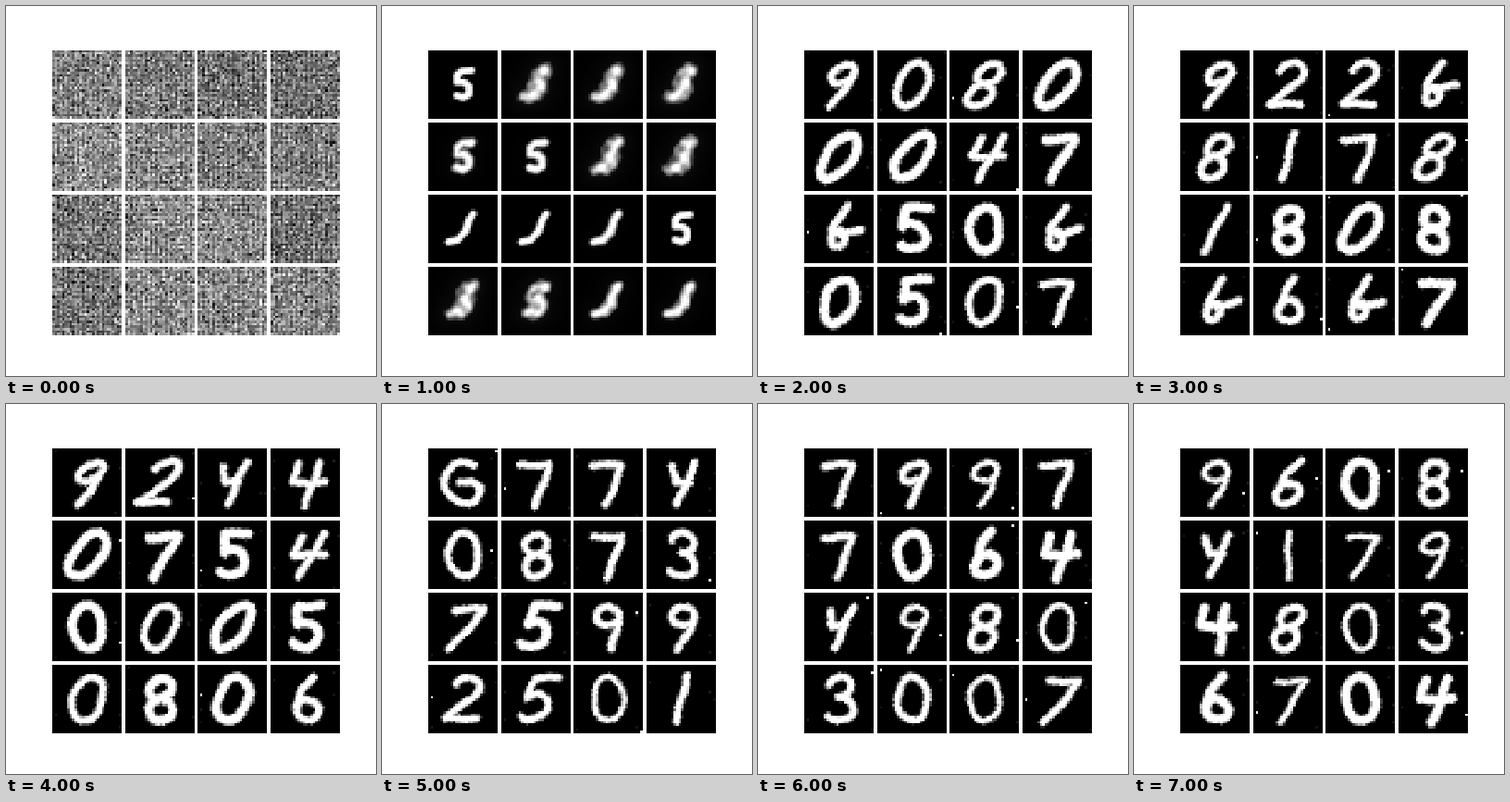
Recreate the animation shown at these times as a matplotlib script. Size 400 px wide and 400 px high, loop 8 s.

```python
import numpy as np
import matplotlib.pyplot as plt
from matplotlib.animation import FuncAnimation
from matplotlib.gridspec import GridSpec

N = 28        # pixels along one side of a tile
HALF = 9.2    # half the height of a digit, in tile pixels
yy, xx = np.mgrid[0:N, 0:N] + 0.5


def arc(cx, cy, rx, ry, start=0, end=360):
    a = np.radians(np.linspace(start, end, 60))
    return np.column_stack([cx + rx * np.cos(a), cy + ry * np.sin(a)])


def line(*flat):
    p = np.reshape(flat, (-1, 2))
    t = np.linspace(0, len(p) - 1, 60)
    k = np.arange(len(p))
    return np.column_stack([np.interp(t, k, p[:, 0]), np.interp(t, k, p[:, 1])])


# Skeletons around the tile centre, y downwards from -1 to 1
glyphs = {
    "0": [arc(0, 0, .65, .95)],
    "1": [line(0, -1, 0, 1)],
    "2": [arc(0, -.45, .55, .5, 200, 400), line(.42, -.13, -.6, .85, .75, .85)],
    "3": [arc(0, -.5, .5, .45, 200, 450), arc(0, .45, .6, .5, 270, 510)],
    "4": [line(-.5, -.8, -.6, 0, .8, 0), line(.4, -.9, .2, 1)],
    "5": [line(.7, -.95, -.3, -.9, -.4, -.15), arc(-.05, .35, .6, .55, 235, 500)],
    "6": [arc(.05, .45, .5, .45), line(.3, -1, -.15, -.4, -.4, .4)],
    "7": [line(-.7, -.75, .55, -.8, .35, -.1, -.1, 1)],
    "8": [arc(0, -.45, .48, .43), arc(0, .48, .5, .48)],
    "9": [arc(-.05, -.45, .5, .4), line(.45, -.5, .35, .2, .1, 1)],
    "b": [line(.1, -1, -.3, 0, -.2, .7), arc(.05, .45, .3, .35), line(.1, .25, 1, 0)],
    "y": [line(-.4, -.7, -.3, 0, .3, -.05), line(.6, -.9, .2, 0, -.2, .95)],
    "G": [arc(0, 0, .8, .9, 300, 15), line(.75, .2, .4, -.1, -.1, 0)],
}

# One word per tile: "/" leans it, "+" makes it bolder, "-" thinner
words = {
    3: "9// 2/ 2/ b/  8/ 1/ 7 8//  1// 8+ 0//+ 8+  b/ 6 b/ 7/+",
    4: "9// 2// y 4/  0//+ 7/+ 5+ 4//  0+ 0/ 0//+ 5+  0/ 8+ 0/+ 6",
    5: "G 7 7 y  0 8 7 3  7// 5/+ 9 9/  2/ 5/ 0- 1/",
    7: "9/- 6/ 0+ 8  y 1- 7/- 9/-  4+ 8/ 0- 3  6+ 7/- 0+ 4/+",
}
words = {k: w.split() for k, w in words.items()}


def remix(seed, pool):
    return list(np.random.default_rng(seed).permutation(pool)[:16])


words[2] = remix(2, words[3] + words[4])
words[6] = remix(6, words[5] + words[7])


def distance(strokes):
    p = N / 2 + 0.2 + HALF * np.vstack(strokes)
    return np.hypot(xx[..., None] - p[:, 0], yy[..., None] - p[:, 1]).min(-1)


def ink(d, width, soft=1.1):
    return np.clip(0.5 + (width / 2 - d) / soft, 0, 1)


def written(word, rng):
    """A slightly wobbly digit with a few stray specks."""
    lean = 0.25 * word.count("/")
    width = 3.1 + 0.8 * word.count("+") - 0.6 * word.count("-")
    phase = rng.uniform(0, 2 * np.pi, 2)
    strokes = []
    for p in glyphs[word[0]]:
        x, y = p.T
        strokes.append(np.column_stack([x - lean * y + 0.04 * np.sin(4 * y + phase[0]),
                                        y + 0.04 * np.sin(4 * x + phase[1])]))
    img = ink(distance(strokes) + rng.normal(0, 0.15, (N, N)), width)
    for level in (0.08, 0.12, rng.choice([0.1, 0.9])):
        row, col = rng.integers(N), rng.choice([1, 25, 27])
        img[row, col] = max(img[row, col], level)
    return img


# The early shapes all lie between a narrow five and a long swash
five = distance([line(.35, -.63, -.05, -.6, -.28, -.4, -.28, -.1, .05, -.1, .25, .1,
                      .25, .4, 0, .57, -.28, .47)])
swash = distance([line(-.66, .57, -.25, .48, .1, .1, .25, -.4, .42, -.66)])


def blended(mix, rng):
    blur = 4 * mix * (1 - mix)
    d = (1 - mix) * five + mix * swash
    ripple = np.sin(xx * 1.1 + rng.uniform(0, 6)) * np.sin(yy * 0.9 + rng.uniform(0, 6))
    img = ink(d + 0.5 * blur * ripple, 2.8 + 1.6 * blur, 1.1 + 1.9 * blur)
    return np.maximum(img, 0.1 * blur * np.exp(-d / 4))


def noise(rng):
    """Grey static with the faint two-pixel grid of an untrained network."""
    img = rng.normal(rng.uniform(0.42, 0.56), 0.15, (N, N))
    img += 0.06 * np.cos(np.pi * (xx - 0.5)) * -1
    img += 0.04 * np.cos(np.pi * (yy - 0.5)) * -1
    return np.clip(img, 0, 1)


mixes = [0, .6, .7, .6,  .1, .05, .65, .6,  1, 1, .95, 0,  .6, .3, .85, .85]


def render(sheet, cell):
    rng = np.random.default_rng(16 * sheet + cell)
    if sheet == 0:
        return noise(rng)
    if sheet == 1:
        return blended(mixes[cell], rng)
    return written(words[sheet][cell], rng)


images = [[render(s, c) for c in range(16)] for s in range(8)]

fig = plt.figure(figsize=(4, 4), dpi=100, facecolor="white")
grid = GridSpec(4, 4, figure=fig, left=0.125, right=0.9, bottom=0.11, top=0.88,
                wspace=0.05, hspace=0.05)
views = []
for c in range(16):
    ax = fig.add_subplot(grid[c // 4, c % 4])
    ax.axis("off")
    views.append(ax.imshow(images[0][c], cmap="gray", vmin=0, vmax=1,
                           interpolation="nearest"))


def update(i):
    for view, img in zip(views, images[i]):
        view.set_data(img)
    return views


anim = FuncAnimation(fig, update, frames=8, interval=1000, repeat=True, repeat_delay=0)
plt.show()
```
